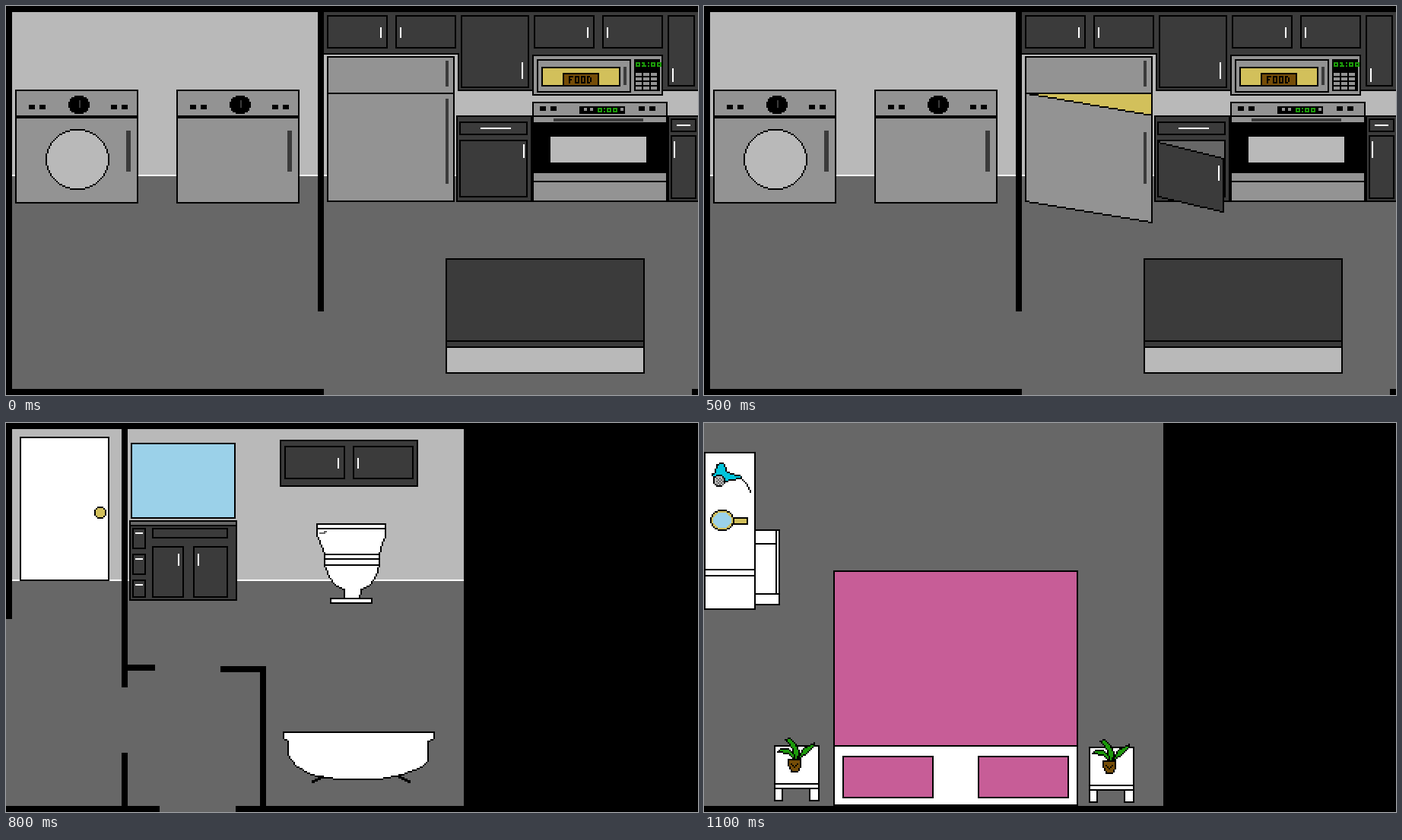
An HTML page with a canvas for the animation above (1.2 s loop, 910 by 512 pixels).

```html
<!DOCTYPE html>
<html lang="en">
<head>
<meta charset="utf-8">
<title>House rooms</title>
<style>
html, body { margin: 0; width: 100%; height: 100%; overflow: hidden; background: #000; }
canvas { display: block; width: 910px; height: 512px; }
</style>
</head>
<body>
<canvas id="stage" width="910" height="512"></canvas>
<script>
const ctx = document.getElementById('stage').getContext('2d');
const BLACK = '#000', WHITE = '#fff', WALL = '#b9b9b9', FLOOR = '#676767', STEEL = '#939393',
  DARK = '#3b3b3b', YELLOW = '#d2c05b', BROWN = '#754d08', BLUE = '#315ae9', SKY = '#9bd1e9',
  PINK = '#c75d97', GREEN = '#1c9a0a', CYAN = '#00c5dc', RED = '#d02030';
const PX = 2;
const snap = v => Math.round(v / PX) * PX;

// Edges are given as left, top, right, bottom.
function fill(x0, y0, x1, y1, color = BLACK) {
  ctx.fillStyle = color;
  ctx.fillRect(x0, y0, x1 - x0, y1 - y0);
}
function box(x0, y0, x1, y1, color) {
  fill(x0, y0, x1, y1);
  fill(x0 + PX, y0 + PX, x1 - PX, y1 - PX, color);
}
const hline = (x0, x1, y, color) => fill(x0, y, x1, y + PX, color);
const vline = (x, y0, y1, color) => fill(x, y0, x + PX, y1, color);

function line(x0, y0, x1, y1, color = BLACK) {
  const n = Math.max(Math.abs(x1 - x0), Math.abs(y1 - y0)) / PX || 1;
  for (let i = 0; i <= n; i++) {
    const x = snap(x0 + (x1 - x0) * i / n), y = snap(y0 + (y1 - y0) * i / n);
    fill(x, y, x + PX, y + PX, color);
  }
}
function poly(pts, color) {
  const edges = pts.map((p, i) => [p, pts[(i + 1) % pts.length]]);
  const ys = pts.map(p => p[1]);
  for (let y = Math.min(...ys); y < Math.max(...ys); y += PX) {
    const cuts = edges
      .filter(([a, b]) => (a[1] <= y) !== (b[1] <= y))
      .map(([a, b]) => a[0] + (y - a[1]) * (b[0] - a[0]) / (b[1] - a[1]))
      .sort((a, b) => a - b);
    for (let i = 0; i + 1 < cuts.length; i += 2) fill(snap(cuts[i]), y, snap(cuts[i + 1]), y + PX, color);
  }
  edges.forEach(([a, b]) => line(...a, ...b));
}
function disc(cx, cy, rx, ry, color) {
  for (let y = cy - ry; y < cy + ry; y += PX) {
    const half = snap(rx * Math.sqrt(1 - ((y + 1 - cy) / ry) ** 2));
    fill(cx - half, y, cx + half, y + PX, color);
  }
}
function ring(cx, cy, rx, ry, color) {
  const inside = (x, y) => ((x + 1 - cx) / rx) ** 2 + ((y + 1 - cy) / ry) ** 2 <= 1;
  for (let y = cy - ry; y < cy + ry; y += PX)
    for (let x = cx - rx; x < cx + rx; x += PX) {
      if (!inside(x, y)) continue;
      const inner = inside(x - PX, y) && inside(x + PX, y) && inside(x, y - PX) && inside(x, y + PX);
      fill(x, y, x + PX, y + PX, inner ? color : BLACK);
    }
}

// Pixel lettering: rows separated by spaces.
const GLYPHS = {
  F: '111 100 110 100 100', O: '111 101 101 101 111', D: '110 101 101 101 110',
  0: '111 101 111', 1: '110 010 111', ':': '1 0 1'
};
function write(text, x, y, color) {
  for (const ch of text) {
    const rows = GLYPHS[ch].split(' ');
    rows.forEach((row, r) => [...row].forEach((on, c) => {
      if (on === '1') fill(x + c * PX, y + r * PX, x + c * PX + PX, y + r * PX + PX, color);
    }));
    x += (rows[0].length + 1) * PX;
  }
}

function washer(dx, round) {
  box(12 + dx, 110, 174 + dx, 260, STEEL);
  fill(12 + dx, 144, 174 + dx, 148);
  for (const x of [30, 44, 138, 152]) fill(x + dx, 130, x + dx + 8, 136);
  disc(96 + dx, 130, 14, 12, BLACK);
  vline(96 + dx, 124, 134, DARK);
  if (round) ring(94 + dx, 202, 42, 40, WALL);
  fill(158 + dx, 164, 164 + dx, 218, DARK);
}

function fridge(open) {
  box(422, 66, 590, 258, STEEL);
  fill(578, 72, 582, 106, DARK);
  const drop = snap(28 * open);
  if (open) {
    fill(424, 116, 588, 146, YELLOW);
    poly([[422, 114], [588, 114 + drop + 1], [588, 256 + drop], [422, 256]], STEEL);
  }
  hline(422, 590, 114);
  fill(578, 122 + snap(44 * open), 582, 234, DARK);
}

function leftCupboard(open) {
  box(592, 144, 692, 258, DARK);
  box(596, 152, 686, 170, DARK);
  hline(624, 664, 160, WHITE);
  box(596, 176, 686, 252, open ? FLOOR : DARK);
  if (open) {
    const top = snap(22 * open), low = snap(20 * open);
    poly([[596, 178], [682, 178 + top], [682, 250 + low], [596, 250]], DARK);
    vline(676, 182 + snap(28 * open), 200 + snap(30 * open), WHITE);
  } else vline(680, 182, 200, WHITE);
}

function rightCupboard(open) {
  box(870, 144, 912, 258, DARK);
  box(874, 148, 908, 166, DARK);
  hline(882, 900, 156, WHITE);
  box(874, 170, 908, 254, open ? FLOOR : DARK);
  if (open) {
    poly([[874, 188], [906, 172], [906, 252], [874, 268]], DARK);
    vline(878, 192, 210, WHITE);
  } else vline(878, 178, 200, WHITE);
}

function microwave() {
  box(692, 64, 864, 118, STEEL);
  box(698, 70, 822, 114, STEEL);
  box(704, 80, 808, 106, YELLOW);
  box(732, 88, 780, 106, BROWN);
  write('FOOD', 740, 92, BLACK);
  fill(812, 80, 816, 104, DARK);
  fill(826, 70, 860, 112);
  write('01:00', 828, 74, GREEN);
  for (let r = 0; r < 4; r++)
    for (let c = 0; c < 3; c++) fill(828 + c * 10, 88 + r * 6, 836 + c * 10, 92 + r * 6, STEEL);
}

function stove() {
  box(692, 126, 870, 258, STEEL);
  for (const x of [702, 716, 832, 846]) fill(x, 132, x + 8, 138);
  fill(754, 132, 814, 142);
  for (const x of [760, 768, 808]) fill(x, 134, x + 4, 138, STEEL);
  write('0:00', 778, 134, GREEN);
  hline(692, 870, 144);
  fill(720, 148, 838, 152, DARK);
  fill(692, 153, 870, 220);
  fill(716, 172, 842, 206, WALL);
  hline(692, 870, 230);
}

function kitchen(fridgeOpen, leftOpen, rightOpen) {
  fill(8, 8, 910, 222, WALL);
  hline(8, 910, 222, WHITE);
  fill(8, 224, 910, 504, FLOOR);
  fill(418, 504, 902, 512, FLOOR);
  fill(410, 0, 418, 402);
  washer(0, true);
  washer(212, false);

  fill(418, 8, 910, 64, DARK);
  hline(418, 594, 62);
  fill(594, 62, 692, 112);
  fill(596, 8, 692, 110, DARK);
  fill(864, 62, 910, 112);
  fill(864, 8, 910, 110, DARK);
  for (const [x0, x1, y1] of [[422, 502, 56], [512, 592, 56], [598, 688, 108],
    [694, 774, 56], [784, 864, 56], [870, 906, 106]]) box(x0, 12, x1, y1, DARK);
  for (const x of [492, 518, 764, 790]) vline(x, 28, 42, WHITE);
  vline(678, 74, 96, WHITE);
  vline(876, 82, 100, WHITE);

  fridge(fridgeOpen);
  leftCupboard(leftOpen);
  rightCupboard(rightOpen);
  microwave();
  stove();

  box(578, 332, 840, 484, DARK);
  hline(578, 840, 440);
  hline(578, 840, 448);
  fill(580, 450, 838, 482, WALL);
}

function chair(dy) {
  box(590, 102 + dy, 600, 186 + dy, BROWN);
  box(598, 156 + dy, 654, 186 + dy, BROWN);
  box(590, 178 + dy, 654, 186 + dy, BROWN);
  box(590, 184 + dy, 600, 224 + dy, BROWN);
  box(644, 184 + dy, 654, 224 + dy, BROWN);
}

function livingRoom() {
  fill(8, 0, 902, 504, FLOOR);
  box(18, 256, 30, 270, WHITE);
  box(78, 256, 92, 270, WHITE);
  box(18, 102, 92, 258, WHITE);
  hline(18, 92, 244);
  box(40, 86, 60, 236, FLOOR);
  hline(40, 60, 210);
  line(46, 236, 40, 240);
  line(46, 238, 44, 240);
  line(52, 236, 56, 240);
  line(52, 238, 54, 240);
  fill(68, 210, 86, 220);
  fill(66, 212, 88, 218);
  for (let x = 70; x < 86; x += 4) {
    fill(x, 212, x + PX, 214, WHITE);
    fill(x, 216, x + PX, 218, WHITE);
  }
  fill(68, 214, 70, 218, RED);

  box(148, 102, 256, 258, BLUE);
  box(238, 86, 256, 198, BLUE);
  for (const y of [112, 132, 206, 218]) hline(148, 240, y);
  vline(238, 86, 220);
  line(170, 258, 162, 264);
  line(168, 258, 164, 262);
  line(236, 258, 244, 264);
  line(238, 258, 242, 262);

  chair(0);
  chair(126);
  box(676, 314, 688, 370, BROWN);
  box(796, 314, 808, 370, BROWN);
  box(674, 78, 810, 316, BROWN);
  hline(674, 810, 302);
}

function toilet() {
  poly([[408, 132], [498, 132], [498, 148], [494, 158], [490, 172], [418, 172], [412, 156], [408, 148]], WHITE);
  hline(408, 500, 138);
  fill(418, 142, 422, 144, FLOOR);
  fill(412, 144, 420, 146, FLOOR);
  poly([[418, 186], [490, 186], [486, 200], [478, 212], [466, 218], [464, 232], [444, 232],
    [444, 218], [432, 212], [424, 202]], WHITE);
  box(418, 172, 492, 188, WHITE);
  hline(418, 492, 178);
  box(426, 230, 482, 238, WHITE);
}

function bathroom() {
  fill(8, 8, 602, 206, WALL);
  hline(8, 602, 206, WHITE);
  fill(8, 208, 602, 504, FLOOR);
  fill(0, 258, 8, 504, FLOOR);
  fill(202, 504, 302, 512, FLOOR);
  fill(152, 0, 160, 348);
  fill(152, 434, 160, 512);
  fill(160, 318, 196, 326);
  fill(282, 320, 342, 328);
  fill(334, 320, 342, 512);

  box(18, 18, 136, 208, WHITE);
  ring(124, 118, 8, 8, YELLOW);
  box(164, 26, 302, 126, SKY);
  box(162, 128, 304, 234, DARK);
  box(162, 128, 304, 136, FLOOR);
  for (const [y0, y1] of [[138, 166], [172, 200], [206, 230]]) {
    box(166, y0, 184, y1, DARK);
    hline(170, 180, y0 + 6, WHITE);
  }
  box(192, 138, 292, 152, DARK);
  box(192, 162, 234, 230, DARK);
  box(246, 162, 292, 230, DARK);
  vline(226, 172, 188, WHITE);
  vline(252, 172, 188, WHITE);

  box(360, 22, 542, 84, DARK);
  box(366, 30, 446, 74, DARK);
  box(456, 30, 536, 74, DARK);
  vline(436, 46, 60, WHITE);
  vline(462, 46, 60, WHITE);
  toilet();

  poly([[364, 406], [562, 406], [562, 414], [554, 418], [554, 444], [546, 452], [520, 462], [490, 468],
    [436, 468], [400, 462], [380, 450], [370, 436], [370, 418], [364, 414]], WHITE);
  for (const d of [0, PX]) {
    line(416, 464 + d, 402, 470 + d);
    line(516, 464 + d, 530, 470 + d);
  }
}

function nightstand(dx, dy) {
  ctx.save();
  ctx.translate(dx, dy);
  box(92, 424, 152, 482, WHITE);
  hline(92, 152, 474);
  box(92, 480, 104, 498, WHITE);
  box(138, 480, 152, 498, WHITE);
  poly([[118, 442], [110, 434], [96, 432], [100, 428], [110, 428], [118, 434]], GREEN);
  poly([[122, 442], [130, 428], [144, 420], [144, 424], [136, 432], [126, 440]], GREEN);
  poly([[118, 442], [116, 428], [106, 416], [112, 414], [120, 422], [124, 432], [122, 442]], GREEN);
  poly([[110, 442], [126, 442], [126, 450], [122, 458], [114, 458], [110, 450]], BROWN);
  line(114, 448, 118, 452);
  line(118, 452, 122, 448);
  ctx.restore();
}

function hairDryer() {
  poly([[16, 54], [20, 52], [24, 52], [28, 58], [28, 62], [34, 66], [46, 68], [48, 72],
    [34, 74], [26, 76], [12, 72], [10, 66], [14, 64]], CYAN);
  line(28, 62, 32, 64);
  ring(20, 76, 8, 8, WALL);
  for (let y = 72; y < 82; y += PX)
    for (let x = 16 + y / PX % 2 * PX; x < 26; x += PX * 2) fill(x, y, x + PX, y + PX, FLOOR);
  line(48, 72, 54, 78);
  line(54, 78, 60, 90);
}

function bedroom(stool) {
  fill(0, 0, 604, 504, FLOOR);
  if (stool) {
    box(66, 140, 100, 240, WHITE);
    hline(66, 96, 158);
    hline(66, 100, 224);
    vline(94, 140, 226);
  }
  box(0, 38, 68, 246, WHITE);
  hline(0, 68, 192);
  hline(0, 68, 200);
  hairDryer();
  box(36, 124, 58, 134, YELLOW);
  ring(24, 128, 16, 14, YELLOW);
  disc(24, 128, 12, 10, SKY);

  box(170, 194, 492, 504, PINK);
  fill(172, 424, 490, 502, WHITE);
  hline(170, 492, 424);
  box(182, 438, 302, 494, PINK);
  box(360, 438, 480, 494, PINK);
  nightstand(0, 0);
  nightstand(414, 2);
}

const STEP_MS = 100;
const steps = [
  () => kitchen(0, 0, 0),
  () => kitchen(1 / 3, 0, 0),
  () => kitchen(2 / 3, 0, 0),
  () => kitchen(1, 0, 0),
  () => kitchen(1, 0.5, 0),
  () => kitchen(1, 1, 0),
  () => kitchen(1, 1, 1),
  livingRoom,
  bathroom,
  bathroom,
  () => bedroom(false),
  () => bedroom(true)
];

let shown = -1;
function tick() {
  const step = Math.floor(performance.now() / STEP_MS) % steps.length;
  if (step !== shown) {
    shown = step;
    fill(0, 0, 910, 512);
    steps[step]();
  }
  requestAnimationFrame(tick);
}
tick();
</script>
</body>
</html>
```
